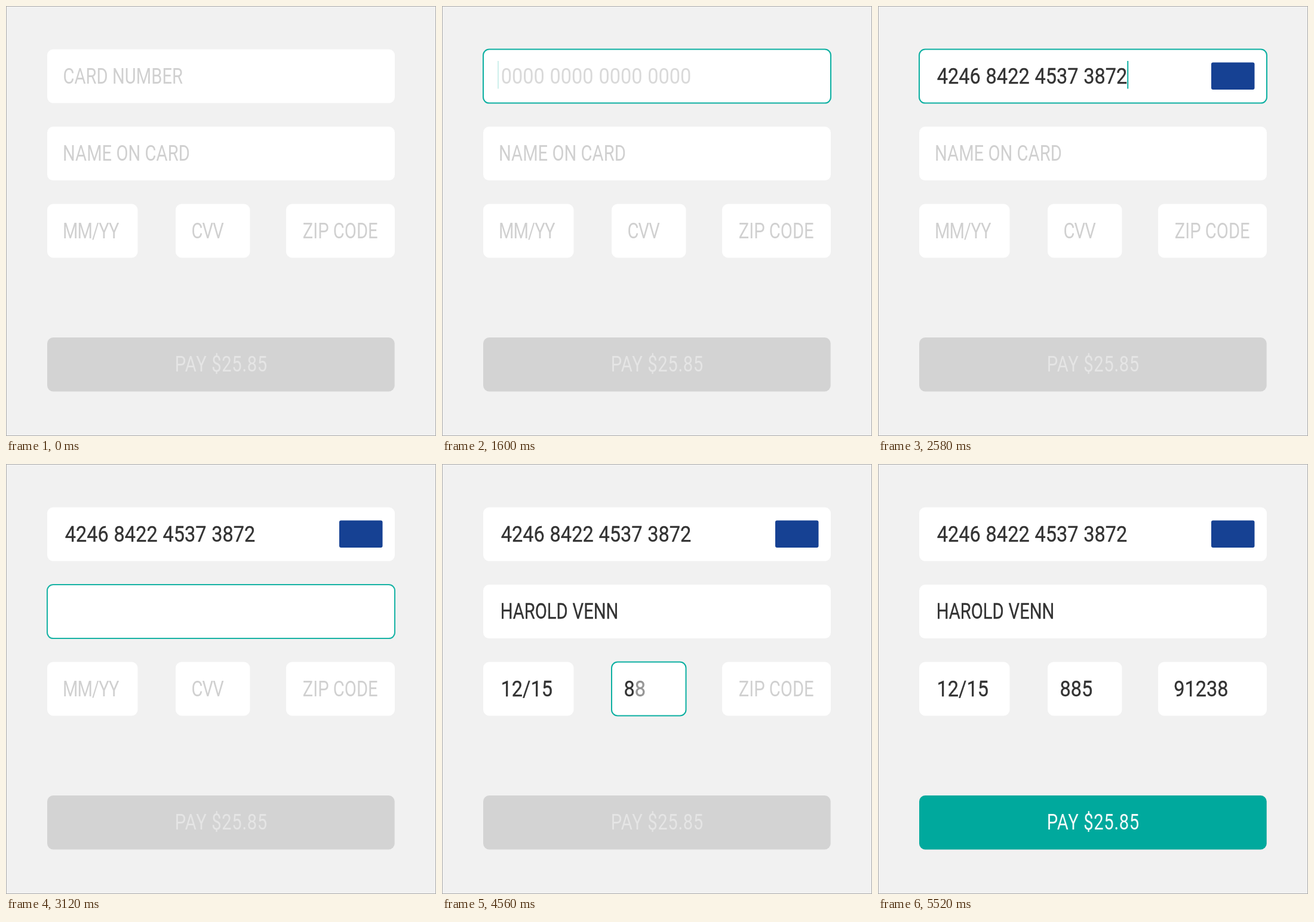
Write an HTML page that moves like this. It is 720x720 px and loops after 6.02 s.

```html
<!DOCTYPE html>
<html lang="en">
<head>
<meta charset="utf-8">
<title>Payment form</title>
<style>
  html, body { margin: 0; width: 100%; height: 100%; overflow: hidden; background: #f1f1f1; }
  svg { display: block; width: 100vw; height: 100vh; }
  text { font: 400 36.5px Roboto, "Liberation Sans", sans-serif; white-space: pre; }
  .hint { fill: #d0d0d0; }
  .tight { letter-spacing: -1.2px; }
  .typed { fill: #333; stroke: #333; stroke-width: .35; }
  .digits { word-spacing: .8px; }
  .pay { letter-spacing: .8px; text-anchor: middle; }
  .box { fill: #fff; }
  .focus { fill: none; stroke: #0cafa1; stroke-width: 2; }
</style>
</head>
<body>
<svg id="stage" viewBox="0 0 720 720" xmlns="http://www.w3.org/2000/svg"></svg>
<script>
const LOOP = 6020, STEP = 20, FADE = 100;
const HEIGHT = 90, BASELINE = 57;
const LETTERS = 0.8, DIGITS = 0.89;   // condensed faces

const stage = document.getElementById('stage');
const tracks = [];

function add(tag, attrs, parent = stage) {
  const el = document.createElementNS(stage.namespaceURI, tag);
  for (const key in attrs) el.setAttribute(key, attrs[key]);
  return parent.appendChild(el);
}

// Opacity starts at `first` (0 or 1) and flips with a short fade at each time.
function fade(el, first, times, props = ['opacity']) {
  tracks.push(t => {
    let value = first, dir = first ? -1 : 1;
    for (const start of times) {
      value += dir * Math.min(1, Math.max(0, (t - start) / FADE));
      dir = -dir;
    }
    props.forEach(name => el.setAttribute(name, value.toFixed(3)));
  });
  return el;
}

function rect(x, y, width, cls) {
  return add('rect', { x, y, width, height: HEIGHT, rx: 10, class: cls });
}

function label(str, x, y, face, cls, extra = {}, parent = stage) {
  const el = add('text', {
    transform: `translate(${x} ${y + BASELINE}) scale(${face} 1)`, class: cls, ...extra
  }, parent);
  el.textContent = str;
  return el;
}

function typed(str, x, y, face, start, pace) {
  const el = label('', x, y, face, 'typed digits');
  let key = 0;
  for (const ch of str) {
    const span = add('tspan', {}, el);
    span.textContent = ch;
    const skip = ch === ' ' && face === DIGITS;
    if (!skip) fade(span, 0, [start + pace * key++], ['fill-opacity', 'stroke-opacity']);
  }
  return el;
}

const fields = [
  { x: 69, y: 72.6, w: 582, hint: 'CARD NUMBER', hintX: 95.5, hintOut: 1085, focus: [1080, 2945],
    text: '4246 8422 4537 3872', textX: 98.8, face: DIGITS, start: 1725, pace: 47 },
  { x: 69, y: 202.1, w: 582, hint: 'NAME ON CARD', hintX: 95, hintOut: 3000, focus: [3025, 3590],
    text: 'HAROLD VENN', textX: 97.8, face: LETTERS, start: 3130, pace: 38 },
  { x: 69, y: 331.5, w: 151.5, hint: 'MM/YY', hintX: 95, hintOut: 3600, focus: [3610, 4200], tight: true,
    text: '12/15', textX: 98.5, face: DIGITS, start: 3700, pace: 90 },
  { x: 284, y: 331.5, w: 124.5, hint: 'CVV', hintX: 310.5, hintOut: 4320, focus: [4200, 4690], tight: true,
    text: '885', textX: 304.5, face: DIGITS, start: 4430, pace: 80 },
  { x: 469, y: 331.5, w: 182, hint: 'ZIP CODE', hintX: 496.7, hintOut: 4740, focus: [4700, 5420],
    text: '91238', textX: 495.3, face: DIGITS, start: 4850, pace: 85 }
];

add('rect', { width: 720, height: 720, fill: '#f1f1f1' });
add('rect', { x: .5, y: .5, width: 719, height: 719, fill: 'none', stroke: '#aaa' });

for (const f of fields) {
  rect(f.x, f.y, f.w, 'box');
  fade(rect(f.x, f.y, f.w, 'focus'), 0, f.focus);
  fade(label(f.hint, f.hintX, f.y, LETTERS, f.tight ? 'hint tight' : 'hint'), 1, [f.hintOut]);
  f.node = typed(f.text, f.textX, f.y, f.face, f.start, f.pace);
}

const card = fields[0];
fade(label('0000 0000 0000 0000', card.textX, card.y, DIGITS, 'hint digits'), 0, [1080, 1580]);

const badge = add('rect', { x: 558, y: 94.5, width: 72.5, height: 45.5, rx: 3, fill: '#164193' });
tracks.push(t => badge.setAttribute('opacity', Math.min(1, Math.max(0, (t - 1860) / 220))));

// Caret: sits before the first digit, then follows the last finished one.
const caret = add('rect', { y: 92, width: 2, height: 46.5, fill: '#0cafa1' });
fade(caret, 0, [1080, 1400, 1580, 2600, 2740, 2850]);
tracks.push(t => {
  const done = Math.min(16, Math.max(0, Math.floor((t - card.start - 60) / card.pace) + 1));
  let x = 93;
  if (done) {
    const last = done - 1 + Math.floor((done - 1) / 4);
    x = card.textX + card.node.getEndPositionOfChar(last).x * DIGITS;
  }
  caret.setAttribute('x', x);
});

function button(fill, ink, parent) {
  add('rect', { x: 69, y: 555, width: 581.7, height: 90.4, rx: 10, fill }, parent);
  label('PAY $25.85', 360.3, 555.2, LETTERS, 'pay', { fill: ink }, parent);
}
button('#d3d3d3', '#e5e5e5', stage);
button('#00a99d', '#f4fbfa', fade(add('g', {}), 0, [5300]));

function draw() {
  const t = Math.floor(performance.now() % LOOP / STEP) * STEP;
  tracks.forEach(update => update(t));
  requestAnimationFrame(draw);
}
draw();
</script>
</body>
</html>
```
